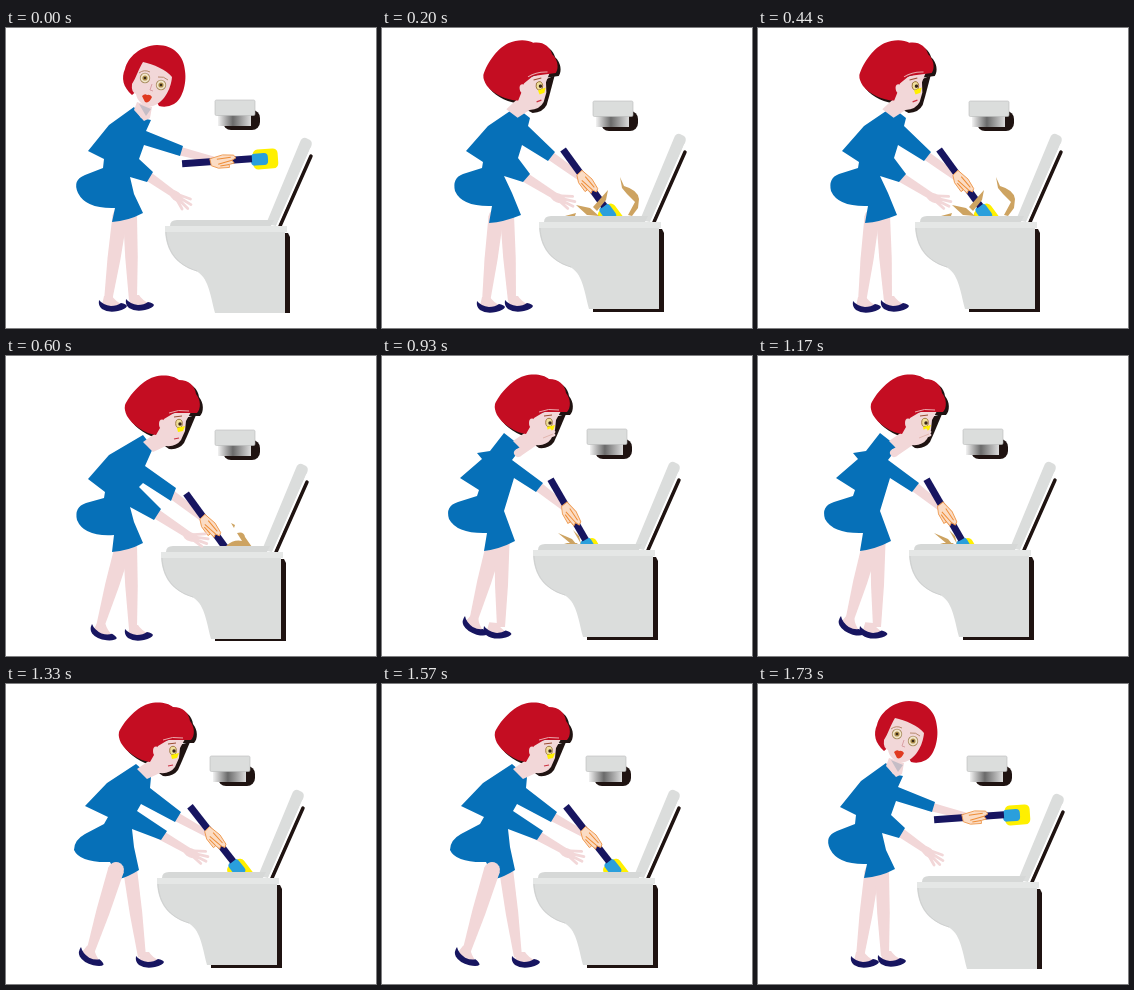
An HTML page for the animation above (1990 ms loop, 370 px wide and 300 px high).

```html
<!DOCTYPE html>
<html lang="en">
<head>
<meta charset="utf-8">
<title>Scrubbing</title>
<style>
html, body { margin: 0; width: 100%; height: 100%; overflow: hidden; background: #fff; }
svg { display: block; }
</style>
</head>
<body>
<svg id="stage" width="370" height="300" viewBox="0 0 370 300"></svg>
<script>
const SKIN = '#f2d7d8', BLUE = '#0670b8', RED = '#c40d22', NAVY = '#171560',
      GREY = '#dbdddc', DARK = '#1f1311', YELLOW = '#fff000', CYAN = '#2a9fdc', BROWN = '#cda361';

const path = (d, fill, extra = '') => `<path d="${d}" fill="${fill}" ${extra}/>`;
const line = (d, color, w, extra = '') =>
  `<path d="${d}" fill="none" stroke="${color}" stroke-width="${w}" ${extra}/>`;
const at = (x, y, a, body) => `<g transform="translate(${x} ${y}) rotate(${a})">${body}</g>`;
const dot = (x, y, r, fill) => `<circle cx="${x}" cy="${y}" r="${r}" fill="${fill}"/>`;

// Tapering skin-coloured limb between two points, optionally bulging in the middle
function limb(x1, y1, w1, x2, y2, w2, bulge = 0) {
  const len = Math.hypot(x2 - x1, y2 - y1), a = Math.atan2(y2 - y1, x2 - x1) * 180 / Math.PI;
  const r1 = w1 / 2, r2 = w2 / 2, mid = (r1 + r2) / 2 + bulge;
  return at(x1, y1, a, dot(0, 0, r1, SKIN) +
    path(`M0 ${-r1}Q${len / 2} ${-mid} ${len} ${-r2}V${r2}Q${len / 2} ${mid} 0 ${r1}Z`, SKIN));
}

const leg = l => limb(...l, 1.5);

const shoe = (x, y, a = 0) => at(x, y, a,
  path('M5-4H13Q16 1 24 5L14 9L3 5Z', SKIN) +
  path('M0 0Q4 5 12 6Q18 6 22 3Q27 4 28 6Q27 9 19 11Q9 13 3 9Q-1 6 0 0Z', NAVY));

const openHand = (x, y, a) => at(x, y, a,
  `<ellipse rx="8" ry="4.500" fill="${SKIN}"/>` +
  line('M2-3L13-7M4-1L17-3M4 1L17 2M2 2L13 6', SKIN, 2.8, 'stroke-linecap="round"'));

const holder = (x, y) => at(x, y, 0,
  `<rect x="8" y="10" width="37" height="20" rx="8" fill="${DARK}"/>
   <rect x="3" y="14" width="33" height="12" fill="url(#roll)"/>
   <rect width="40" height="15.5" rx="1.5" fill="${GREY}" stroke="#b9bbba" stroke-width=".6"/>`);

const lid = (x, y) => at(x, y, 0,
  line('M305 128L274 198', DARK, 3.5, 'stroke-linecap="round"') +
  path('M260 196L294 114Q296 109 300 110L304 112Q307 114 305 119L270 198Z', GREY) +
  line('M305 120L271 198', '#fff', 1.2));

const bowl = (x, y) => at(x, y, 0,
  path('M276 205H282L284 209V288H213V284H276Z', DARK) +
  path('M159 203C160 223 170 237 190 243C202 249 204 265 209 285H279V203Z', GREY) +
  path('M164 198Q164 192 171 192H268L265 198Z', '#d6d8d7') +
  path('M159 198H281V204H159Z', '#e5e7e6') +
  line('M160 204C161 223 171 237 191 243', '#c9cbca', .7));

// Brush held at the origin, handle along the x axis
const brush = (x, y, a) => at(x, y, a,
  `<rect x="32" y="-9" width="25" height="20" rx="5" fill="${YELLOW}"/>` +
  `<rect x="30" y="-5" width="17" height="12" rx="4" fill="${CYAN}"/>` +
  line('M-39 0H31', NAVY, 7) +
  path('M-11-3L2-6L13-5L15-2L11 0L13 3L8 4L8 7L-3 7L-10 4Z', '#fbdcc4',
       'stroke="#ee9a50" stroke-width=".9"') +
  line('M-3 3L11 0M-1 5L8 4M-4-2L10-3', '#ee8d36', 1));

const HAIR = 'M119 50C123 41 135 26 148 22C158 19 168 21 173 25C183 25 189 31 190 39C195 45 195 54 191 58L168 58L158 64L154 73L150 80C140 79 126 70 121 61Q118 55 119 50Z';
const FACE = 'M153 66Q162 56 185 57L180 66L179 76L175 85Q170 92 160 91L147 97L137 87L150 78Z';

// Profile head, placed by the tip of the nose
function head(x, y, a) {
  const place = (dx, dy, body) => at(x + dx, y + dy, a, `<g transform="translate(-175 -73)">${body}</g>`);
  return place(3, 3, path(HAIR, DARK) + path('M153 66L187 57L179 76L175 85Q170 92 160 91L153 86Z', DARK)) +
    place(0, 0, path(FACE, SKIN) + path(HAIR, RED) +
      line('M163 58Q172 54 183 56', '#eba9ad', 1) +
      `<ellipse cx="156" cy="69" rx="3" ry="4.500" fill="${SKIN}"/>` +
      `<ellipse cx="173" cy="68.500" rx="3.300" ry="4.200" fill="#efdf9c" stroke="#8d6428" stroke-width=".8"/>` +
      dot(174, 69, 1.7, '#3a2418') +
      line('M168 62L176 61', '#9a4a30', 1) +
      path('M171 73L179 71L177 76L172 77Z', YELLOW) +
      line('M168 84L173 83', '#cc3040', 1.2));
}

const eye = (x, y) =>
  dot(x, y, 5.2, '#a58a5c') + dot(x, y, 4.4, '#f2e6cb') + dot(x, y, 2.6, '#b0904c') + dot(x, y, 1.3, '#382818');

const frontHead =
  path('M131 74L146 79L144 90L138 93L128 82Z', SKIN) +
  path('M133 76L145 81L140 88Z', '#c5bdc6') +
  path('M126 67C117 59 115 50 119 41C122 29 134 18 151 17C168 17 178 28 179 43C181 56 176 72 168 76Q161 80 153 78L140 55Z', RED) +
  path('M137 34C147 36 161 42 166 49C165 62 157 75 147 78C138 80 131 73 130 66Q125 64 126 56C130 50 133 40 137 34Z', SKIN) +
  eye(139, 50) + eye(155, 57) +
  line('M133 45Q138 41 144 44M152 49Q158 48 162 52', '#b08060', .9) +
  line('M146 56L144 62L147 63', '#d9a0a4', 1) +
  path('M136 68Q139 65 141 67Q144 66 146 69Q143 76 139 74Z', '#e03a20');

const dress = d => path(d, BLUE);

function pose(p) {
  return holder(...p.holder) + lid(...p.bowl) + limb(...p.arm) + brush(...p.brush) +
    path(p.splash || 'M0 0', BROWN) + bowl(...p.bowl) +
    p.shoes.map(s => shoe(...s)).join('') + p.legs.map(leg).join('') +
    (p.reach ? limb(...p.reach) + openHand(...p.hand) : '') +
    dress(p.dress) + (p.over || '') + (p.head ? head(...p.head) : frontHead) + (p.front || '');
}

const poses = [
  {
    holder: [209, 72], bowl: [0, 0], arm: [170, 122, 9, 207, 132, 7], brush: [215, 133, -4],
    legs: [[114, 188, 15, 102, 273, 8], [124, 187, 14, 127, 272, 8]],
    shoes: [[93, 272], [120, 271]],
    reach: [139, 146, 10, 169, 167, 7], hand: [170, 168, 40],
    dress: 'M128 79L135 90L145 92L140 103L177 118L174 128L138 117L133 131L147 144L141 154L124 149L128 166L137 185Q122 193 106 194L109 180Q80 181 72 165Q66 152 79 147L97 140L98 131L82 123L103 97Z'
  },
  {
    holder: [211, 73], bowl: [-2, -4], arm: [166, 126, 9, 205, 154, 7], brush: [204, 153, 54],
    legs: [[114, 189, 15, 104, 274, 8], [125, 187, 14, 130, 273, 8]],
    shoes: [[95, 273], [123, 272]],
    reach: [141, 148, 10, 173, 168, 7], hand: [176, 170, 22],
    head: [160, 62, -8],
    splash: 'M238 149L242 158Q256 162 257 171L256 180L250 188L246 187L253 174L245 166L240 160ZM226 162L224 172L215 183L211 179ZM183 188L194 185L193 188ZM194 177L208 180L217 188L205 187Z',
    dress: 'M134 79L148 90L146 98L173 124L166 133L140 117L136 130L148 146L141 154L122 148L130 165L139 187Q122 194 107 195L110 178Q80 179 73 163Q70 150 81 146L100 140L101 134L84 123L106 98Z'
  },
  {
    holder: [209, 74], bowl: [-4, -2], arm: [165, 138, 9, 206, 169, 7], brush: [203, 169, 54],
    legs: [[118, 188, 17, 94, 271, 8], [124, 187, 14, 127, 273, 8]],
    shoes: [[86, 268, 18], [119, 273]],
    reach: [149, 157, 10, 184, 180, 7], hand: [185, 181, 16],
    head: [175, 72, 0],
    splash: 'M225 167L229 169L228 172ZM231 177Q238 175 239 181L246 191L220 190Q228 183 236 185Z',
    dress: 'M137 79L147 92L139 110L170 132L165 145L137 127L133 131L155 153L148 164L124 151L128 166L137 187Q122 195 106 196L108 179Q78 181 71 164Q68 151 80 147L98 142L99 136L82 123L103 99Z'
  },
  {
    holder: [205, 73], bowl: [-8, -4], arm: [153, 128, 10, 190, 157, 7], brush: [188, 157, 60],
    legs: [[113, 187, 17, 91, 266, 8], [120, 187, 15, 119, 271, 8]],
    shoes: [[83, 260, 28], [102, 270, 4]],
    head: [169, 71, 0],
    splash: 'M176 177L190 183L195 189L188 187ZM191 174L197 180L199 188ZM182 187H196L192 190Z',
    front: limb(136, 97, 8, 160, 82, 6) +
      line('M160 82L172 76M161 83L172 79M159 80L168 74', SKIN, 2.8, 'stroke-linecap="round"') +
      line('M161 82L171 78', '#d9a79c', .7),
    dress: 'M122 77L140 91L130 104L161 127L154 136L132 122L122 155L133 185Q118 193 102 195L105 177Q75 178 67 163Q63 150 76 146L95 140L97 134L78 122L100 103L95 97L108 95Z'
  },
  {
    holder: [204, 72], bowl: [-8, -4], arm: [169, 132, 9, 207, 153, 6], brush: [208, 153, 52],
    legs: [[124, 185, 14, 136, 273, 8]],
    shoes: [[75, 263, 26], [130, 272]],
    reach: [153, 150, 10, 184, 168, 7], hand: [185, 169, 22],
    head: [169, 71, 0],
    over: leg([110, 186, 16, 84, 269, 8]),
    dress: 'M130 80L145 93L144 104L175 128L169 138L135 120L131 127L161 147L155 156L126 145L128 163L133 186Q122 193 113 195L104 178Q74 179 68 166Q68 156 79 150L98 140L102 133L79 122L101 99Z'
  }
];

const stage = document.getElementById('stage');
stage.innerHTML =
  `<defs><linearGradient id="roll">
     <stop stop-color="#f2f2f2"/><stop offset=".45" stop-color="#6a6a6a"/><stop offset="1" stop-color="#dcdcdc"/>
   </linearGradient></defs>` +
  poses.map(p => `<g class="pose" display="none">${pose(p)}</g>`).join('') +
  '<rect y="285" width="370" height="15" fill="#fff"/>';

const groups = stage.querySelectorAll('.pose');
const LOOP = 1990, ends = [200, 600, 930, 1330, 1730];
const start = performance.now();

function draw() {
  const t = (performance.now() - start) % LOOP;
  const current = ends.filter(end => t >= end).length % poses.length;
  groups.forEach((g, i) => g.setAttribute('display', i === current ? 'inline' : 'none'));
  requestAnimationFrame(draw);
}
draw();
</script>
</body>
</html>
```
